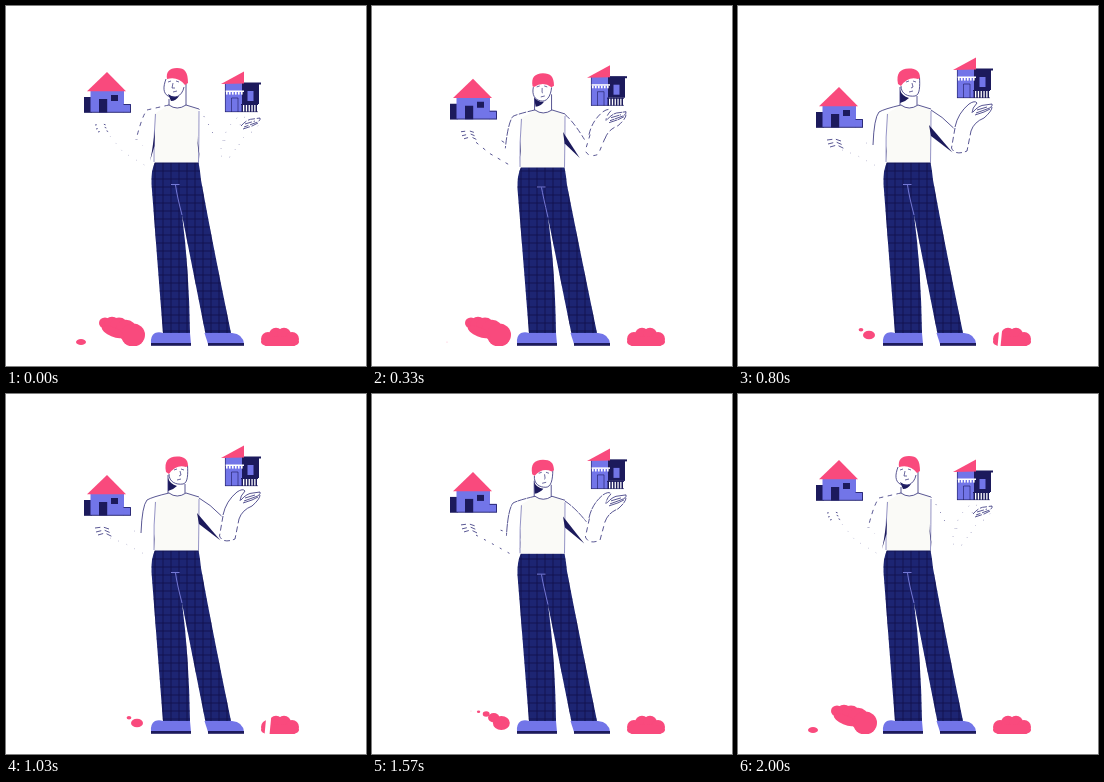
These frames come from a looping animation (360x360 px, 2030 ms). An HTML page with a canvas:

```html
<!DOCTYPE html>
<html lang="en">
<head>
<meta charset="utf-8">
<title>Choosing a house</title>
<style>
  html, body { margin: 0; width: 100%; height: 100%; overflow: hidden; background: #fff; }
  canvas { display: block; width: 360px; height: 360px; }
</style>
</head>
<body>
<canvas id="stage"></canvas>
<script>
const LOOP = 2030, STEPS = 61;
const RISE = 640, FALL = 1420, FALL_TIME = 480;
const PINK = '#f94a7d', BLUE = '#7275e8', NAVY = '#1c1a5c', DENIM = '#1d2573', CREAM = '#fafaf7', INK = '#2f2c78';

const canvas = document.getElementById('stage');
const g = canvas.getContext('2d');
const ratio = window.devicePixelRatio || 1;
canvas.width = canvas.height = 360 * ratio;

const mix = (a, b, u) => a + (b - a) * u;
const clamp = u => Math.min(1, Math.max(0, u));
const ease = u => (1 - Math.cos(Math.PI * clamp(u))) / 2;

// Blend two path strings that share the same commands.
function morph(from, to, u) {
  const ends = to.match(/-?[\d.]+/g);
  let i = 0;
  return from.replace(/-?[\d.]+/g, n => mix(+n, +ends[i++], u).toFixed(2));
}

function fill(d, color) {
  g.fillStyle = color;
  g.fill(new Path2D(d));
}

// ink: 1 is a solid line, smaller values break it into dashes.
function line(d, ink = 1, color = INK, width = 0.8) {
  g.strokeStyle = color;
  g.lineWidth = width;
  g.setLineDash(ink > 0.96 ? [] : [9 * ink, 9 * (1 - ink)]);
  g.stroke(new Path2D(d));
  g.setLineDash([]);
}

function rect(x, y, w, h, color) {
  g.fillStyle = color;
  g.fillRect(x, y, w, h);
}

function blob(x, y, rx, ry = rx, turn = 0) {
  g.fillStyle = PINK;
  g.beginPath();
  g.ellipse(x, y, Math.max(0, rx), Math.max(0, ry), turn, 0, 7);
  g.fill();
}

function shifted(dy, draw) {
  g.save();
  g.translate(0, dy);
  draw();
  g.restore();
}

// The left bush shrinks from its left side as the arms move.
function leftBush(p) {
  const fade = clamp(2 * p - 1);
  for (let u = 0; u <= 1; u += 0.25) {
    const size = 1 - fade * (1.6 - 1.1 * u);
    blob(99 + 28 * u + 4 * fade * u, 317 + 12 * u * u, (6 + 6 * u) * size, (5.5 + 6 * u) * size * (1 - fade / 4));
  }
  const lobe = 1 - 2 * fade;
  blob(107, 326, 12 * lobe, 4.5 * lobe, 0.4);
  const tuft = 1 - 2 * p;
  blob(75, 336, 5 * tuft, 3 * tuft);
}

function rightBush(crack) {
  for (let i = 0; i < 4; i++) blob(262 + 8 * i, 333 - 5 * Math.sin(i * Math.PI / 3), 7);
  blob(274, 336, 19, 6);
  if (crack > 0) line('M263 320L261 341', 1, '#fff', 5 * crack);
}

function bushes(p, crack) {
  g.save();
  g.beginPath();
  g.rect(0, 300, 360, 40);
  g.clip();
  leftBush(p);
  rightBush(crack);
  g.restore();
}

function leftHouse() {
  rect(78, 91, 8, 15.5, NAVY);
  rect(84.5, 85, 33.5, 21.5, BLUE);
  rect(117.5, 98, 7.5, 8.5, BLUE);
  line('M117.5 98.5H124.5V106M78 106.3H125', 1, NAVY);
  fill('M101 66L120 85.3H81Z', PINK);
  rect(93, 93, 8.2, 13.5, NAVY);
  rect(105, 89, 7, 6, NAVY);
}

function rightHouse() {
  rect(219, 77, 17.5, 29, BLUE);
  rect(236, 77, 17, 21, NAVY);
  rect(236, 76.5, 19, 2, NAVY);
  fill('M215 78L238 65.5V77.5Z', PINK);
  rect(241.5, 85, 6, 10, BLUE);
  rect(219, 84.5, 19, 1.5, '#fff');
  for (let x = 220; x < 238; x += 3) rect(x, 86, 1.6, 2.6, '#fff');
  line('M219.4 78V106M225.5 106V92H232V106M219 105.7H252', 1, NAVY, 0.6);
  rect(235, 98, 17, 1, NAVY);
  for (let x = 235.5; x < 252; x += 2.8) rect(x, 98, 1.5, 8, NAVY);
}

function legs(dip) {
  const top = 156 + dip, hip = 174 + dip, crotch = 209 + dip / 2;
  const d = `M149 ${top}H192.5Q194 ${top + 8} 195 ${hip}Q207 240 225 327L199.5 328L176 ${crotch}` +
    `Q183 262 184 327.5H157Q151 250 145.5 ${hip + 4}Q145 ${top + 8} 149 ${top}Z`;
  fill(d, DENIM);
  g.save();
  g.clip(new Path2D(d));
  for (let i = 0; i < 180; i += 8) {
    rect(140, 156 + i, 90, 2, 'rgba(18,16,74,.4)');
    rect(140 + i, 150, 2, 180, 'rgba(18,16,74,.4)');
  }
  g.restore();
  line(`M165 ${178.5 + dip / 2}H173.5M169.5 ${179 + dip / 2}Q171 190 176 ${crotch}`, 1, '#8c8ff0');
}

function shoes() {
  fill('M145 338Q144 330 149 327Q153 325.5 157 327H184L185 338Z', BLUE);
  fill('M202 338L198.5 327H226Q237 328 238 338Z', BLUE);
  rect(145, 337, 40, 2.8, NAVY);
  rect(202, 337, 36, 2.8, NAVY);
}

function shirt(p, q, dip, ink) {
  shifted(dip, () => {
    fill('M163 99Q171 105 180 99L192 103Q194 118 192.5 156.5H148L149 130L148 108Z', CREAM);
    line('M149.5 108Q147.5 130 148 156M193 105Q193 130 192.5 156', 1, '#7a79b8');
    line('M163 99Q171 105 180 99L193 103');
    fill(morph('M149 124L146 145L144 155L148.5 140Z', 'M149 130L149 145L148 155L149 140Z', q), NAVY);
    line(morph('M163 99Q145 103 141 104Q136 110 130 134',
               'M163 99Q146 103 141 106Q136 112 135 139', q), ink(0.5, 1));
    line(morph('M193 103Q200 112 210 134', 'M193 104Q204 110 215.5 122', p), ink(0.1, 1));
  });
  shifted(dip * 0.7, () =>
    fill(morph('M191 130L194 153L192 142Z', 'M191 119L214.5 146.5L193 130Z', q), NAVY));
}

function arms(p, ink) {
  const swing = 4 * p * (1 - p);
  line(morph('M104 130L117 146L140 160M131 133L137 140', 'M104 144L118 149L140 161M128 137L135 138', p),
    0.04 + 0.3 * swing);
  shifted(15 * p, () =>
    line('M89 119L97 118L106 121M90 123L98 121L105 124M92 126L99 124L107 128', ink(0.2, 0.6)));

  line(morph('M219 134L213 147Q217 154 224 151L233 138', 'M217 122L213.5 142Q217 150 229 145L233 125', p),
    ink(0.05, 0.65));
  shifted(14 * (1 - p), () => {
    line('M217 121Q220 107 231 98Q237 94 239 97Q234 102 234 107M233 125Q236 116 246 112Q254 105 254 101',
      ink(0.05, 1));
    line('M235 106Q241 99 247 99L254 98Q255 101 249 103L238 107M239 104L249 101M237 109L246 106L252 103',
      ink(0.8, 1));
  });
}

function head(p) {
  const pose = (a, b) => morph(a, b, p);
  fill(pose('M162 88Q167 92 173 90Q170 95 165 95Z', 'M162 84Q164 90 171 92Q167 96 162 97Z'), NAVY);
  line(pose('M163 93L163 99M180 78L180 99', 'M162 81L162 99M179 90L179 99'));
  line(pose('M160 73C157 81 157 87 162 90C168 93 176 91 178 81',
            'M163 80C163 88 170 91 177 90C182 89 182 80 181.5 71'));
  fill(pose('M161 73C160 66 163 62 171 62C179 62 182 66 182 77L179 79Q172 70 161 73Z',
            'M160 78C158 67 162 63 171 62.5C178 62.5 182 65 182 72L180 73Q170 70 163 80Z'), PINK);
  line(pose('M162 76L165 75M170 75L173 76M167 77L166 82L169 82M167 86L171 85',
            'M168 76L171 75M175 75L178 76M174 77L175 81L173 82M171 86L175 85'), 1, INK, 0.7);
}

function draw(t) {
  // p: 0 with the left house up, 1 with the right house up.
  const p = ease(t / RISE) - ease((t - FALL) / FALL_TIME);
  const q = Math.sqrt(p);
  const dip = 20 * p * (1 - p);
  const crack = Math.sin(Math.PI * clamp((t - RISE) / (FALL - RISE)));
  const ink = (low, high) => mix(low, high, q);
  g.setTransform(ratio, 0, 0, ratio, 0, 0);
  rect(0, 0, 360, 360, '#fff');
  bushes(p, crack);
  legs(dip);
  shoes();
  shirt(p, q, dip, ink);
  arms(p, ink);
  shifted(dip, () => head(p));
  shifted(15 * p, leftHouse);
  shifted(-14 * p, rightHouse);
}

const start = performance.now();
function tick() {
  const t = (performance.now() - start) % LOOP;
  draw(Math.floor(t / LOOP * STEPS) * LOOP / STEPS);
  requestAnimationFrame(tick);
}
tick();
</script>
</body>
</html>
```
